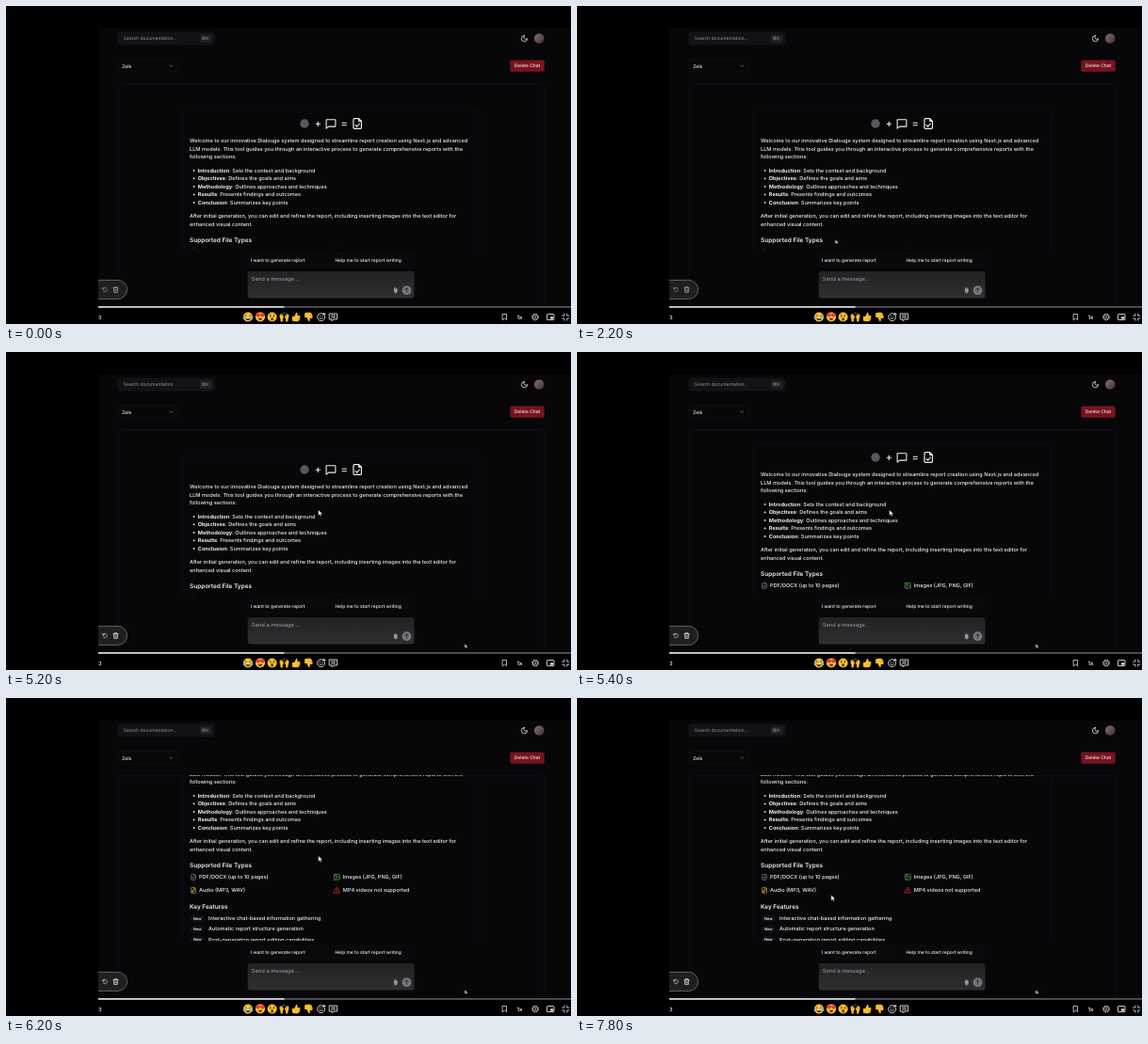
Animation, 600 px wide and 338 px high, one loop 8 s. Source, as an HTML page:

```html
<!DOCTYPE html>
<html lang="en">
<head>
<meta charset="utf-8">
<title>Report chat walkthrough</title>
<style>
html, body { margin: 0; width: 100%; height: 100%; overflow: hidden; background: #000; }
svg.stage { display: block; width: 100vw; height: 100vh; }
text { font-family: Inter, "Liberation Sans", sans-serif; fill: #f1f0f2; text-rendering: geometricPrecision; }
.copy { font-size: 5.59px; font-weight: 500; }
.bold { font-weight: 650; }
.head { font-size: 6.45px; font-weight: 600; }
.small { font-size: 4.92px; font-weight: 500; }
.tag { font-size: 4px; font-weight: 600; }
.muted { fill: #99979d; }
.line { fill: none; stroke: #eee; stroke-width: 2.2; stroke-linecap: round; stroke-linejoin: round; }
.edge { fill: none; stroke: #17151a; stroke-width: .6; }

.scroll, .pointer, .tools { animation: 8s step-end infinite; }
.scroll { animation-name: scroll; }
.outer { animation-name: outer; }
.inner { animation-name: inner; }
.tools { animation-name: tools; }
@keyframes scroll {
  0% { transform: translateY(0); }
  67.5% { transform: translateY(-13px); }
  70% { transform: translateY(-35.4px); }
  72.5% { transform: translateY(-55px); }
  75% { transform: translateY(-66px); }
  77.5%, 100% { transform: translateY(-71px); }
}
@keyframes outer {
  0% { visibility: hidden; transform: translate(284px, 300px); }
  22.5% { visibility: visible; transform: translate(282px, 288px); }
  25% { visibility: visible; transform: translate(276px, 258px); }
  27.5% { visibility: visible; transform: translate(274.4px, 248.6px); }
  30% { visibility: visible; transform: translate(278px, 250px); }
  32.5% { visibility: visible; transform: translate(300px, 262px); }
  35% { visibility: visible; transform: translate(360px, 290px); }
  37.5% { visibility: visible; transform: translate(430px, 316px); }
  40% { visibility: visible; transform: translate(480px, 325px); }
  42.5% { visibility: visible; transform: translate(488px, 317px); }
  45%, 100% { visibility: visible; transform: translate(487.2px, 310.4px); }
}
@keyframes inner {
  0% { visibility: hidden; transform: translate(322px, 176px); }
  42.5% { visibility: visible; transform: translate(325px, 173px); }
  45% { visibility: visible; transform: translate(331px, 167.8px); }
  55% { visibility: visible; transform: translate(331.7px, 167.8px); }
  85% { visibility: visible; transform: translate(326px, 172px); }
  87.5% { visibility: visible; transform: translate(308px, 184px); }
  90% { visibility: visible; transform: translate(290px, 196px); }
  92.5% { visibility: visible; transform: translate(278px, 205px); }
  95% { visibility: visible; transform: translate(272px, 209px); }
  97.5%, 100% { visibility: visible; transform: translate(269.8px, 209.4px); }
}
@keyframes tools {
  0% { opacity: .65; }
  30%, 100% { opacity: 1; }
}
</style>
</head>
<body>
<svg class="stage" viewBox="0 0 600 338" xmlns="http://www.w3.org/2000/svg">
<defs>
  <clipPath id="view"><rect x="119" y="82.5" width="453" height="175"/></clipPath>
  <clipPath id="page"><rect x="98" y="24" width="502" height="314"/></clipPath>
  <linearGradient id="photo" x1="0" y1="0" x2="1" y2="1">
    <stop offset="0" stop-color="#7c6d74"/><stop offset=".55" stop-color="#624d56"/><stop offset="1" stop-color="#30282d"/>
  </linearGradient>
  <linearGradient id="field" x2="0" y2="1">
    <stop offset="0" stop-color="#222124"/><stop offset="1" stop-color="#2f2e31"/>
  </linearGradient>
  <path id="arrow" d="M0 0V6.4L1.6 5 2.7 7.2 3.8 6.7 2.8 4.6H4.7Z" fill="#fff" stroke="#222" stroke-width=".35"/>
  <!-- Icons on a 24 unit grid, centred on the origin -->
  <g id="message"><path d="M-9-9H9Q10-9 10-8V5Q10 6 9 6H-5L-10 10V-8Q-10-9-9-9Z"/></g>
  <g id="file"><path d="M3-10H-6Q-8-10-8-8V8Q-8 10-6 10H6Q8 10 8 8V-5ZV-5H8"/></g>
  <g id="picture"><rect x="-9" y="-9" width="18" height="18" rx="2"/><circle cx="-3" cy="-3" r="2"/><path d="M9 3 4-2-6 9"/></g>
  <g id="warn"><path d="M0-9 10 8H-10ZM0-3V2M0 5V5.2"/></g>
  <g id="chevron"><path d="M-6-3 0 3 6-3"/></g>
  <circle id="face" r="5.4" fill="#fdc62f"/>
  <g id="thumb">
    <path d="M-4.3-.4H-1.9L.3-5.1Q2.2-5 1.5-1.6H4Q5.2-1 4.4.3 5 1.3 4.1 2.1 4.3 3.2 3.4 3.6 3.2 5 1.8 5H-1.5L-4.3 4.3Z" fill="#fcc02c"/>
    <path d="M1.7.3H4.2M1.6 2.1H4M1.5 3.7H3.3" fill="none" stroke="#c98512" stroke-width=".5"/>
  </g>
</defs>

<rect width="600" height="338" fill="#000"/>
<rect x="98" y="24" width="501" height="296" fill="#070609"/>

<!-- Top bar -->
<rect x="119" y="28" width="102" height="13" rx="2" fill="#121115" stroke="#1d1b20" stroke-width=".5"/>
<text class="muted" x="124.8" y="36.3" font-size="4.95">Search documentation...</text>
<rect x="206" y="30.3" width="12.5" height="8.4" rx="1.2" fill="#212024"/>
<text class="muted" x="207.6" y="36.1" font-size="4.6" style="font-family:Inter,'DejaVu Sans',sans-serif">⌘K</text>
<path class="line" transform="translate(550.5 34.6) scale(.35)" d="M0-9A6 6 0 0 0 9 0A9 9 0 1 1 0-9Z"/>
<circle cx="566.2" cy="34.5" r="5.3" fill="url(#photo)"/>

<rect class="edge" x="119" y="57" width="64" height="13" rx="2"/>
<text class="small" x="123.2" y="65.5">Zelk</text>
<use href="#chevron" class="line" style="stroke:#99979d" transform="translate(175.2 63.7) scale(.26)"/>
<rect x="535.4" y="57.4" width="36.3" height="12.3" rx="1.6" fill="#77131f"/>
<text class="small" x="553.5" y="65.4" text-anchor="middle">Delete Chat</text>

<!-- Chat panel -->
<path class="edge" d="M119.3 320V85Q119.3 82.6 121.7 82.6H569.3Q571.7 82.6 571.7 85V320"/>
<g clip-path="url(#view)">
 <g class="scroll">
  <rect class="edge" x="187.3" y="110.8" width="316" height="290" rx="3"/>
  <circle cx="317" cy="125" r="4.7" fill="#59585d"/>
  <path d="M328.7 125.3H333.9M331.3 122.7V127.9M356.7 124.2H361.8M356.7 126.7H361.8" stroke="#eee" stroke-width="1.1"/>
  <use href="#message" class="line" transform="translate(345 125.2) scale(.49)"/>
  <g class="line" transform="translate(373.2 125) scale(.53)"><use href="#file"/><path d="M-4 3-1 6 4 0"/></g>

  <g class="copy" transform="translate(0 .2)">
   <text x="195" y="145.1">Welcome to our innovative Dialouge system designed to streamline report creation using Next.js and advanced</text>
   <text x="195" y="153.7">LLM models. This tool guides you through an interactive process to generate comprehensive reports with the</text>
   <text x="195" y="162.3">following sections:</text>
   <g fill="#eee">
    <circle cx="199.6" cy="174.7" r=".95"/><circle cx="199.6" cy="183.2" r=".95"/><circle cx="199.6" cy="191.7" r=".95"/><circle cx="199.6" cy="200.2" r=".95"/><circle cx="199.6" cy="208.7" r=".95"/>
   </g>
   <text x="203.8" y="176.6"><tspan class="bold">Introduction</tspan>: Sets the context and background</text>
   <text x="203.8" y="185.1"><tspan class="bold">Objectives</tspan>: Defines the goals and aims</text>
   <text x="203.8" y="193.6"><tspan class="bold">Methodology</tspan>: Outlines approaches and techniques</text>
   <text x="203.8" y="202.1"><tspan class="bold">Results</tspan>: Presents findings and outcomes</text>
   <text x="203.8" y="210.6"><tspan class="bold">Conclusion</tspan>: Summarizes key points</text>
   <text x="195" y="224.9">After initial generation, you can edit and refine the report, including inserting images into the text editor for</text>
   <text x="195" y="233.4">enhanced visual content.</text>
   <text class="head" x="195" y="251.2">Supported File Types</text>

   <g class="line" style="stroke:#85818b" transform="translate(199 261.1) scale(.3)"><use href="#file"/><path d="M-4 0H4M-4 5H4"/></g>
   <text x="205" y="263">PDF/DOCX (up to 10 pages)</text>
   <use href="#picture" class="line" style="stroke:#63a95b" transform="translate(351.3 261.1) scale(.32)"/>
   <text x="357.8" y="263">Images (JPG, PNG, GIF)</text>
   <g class="line" style="stroke:#d3a535" transform="translate(199 275.2) scale(.3)"><use href="#file"/><path d="M-2 5V-2L3-3V4"/><circle cx="-4" cy="5" r="2"/></g>
   <text x="205" y="277.1">Audio (MP3, WAV)</text>
   <use href="#warn" class="line" style="stroke:#d32d35" transform="translate(351.3 275.2) scale(.33)"/>
   <text x="357.8" y="277.1">MP4 videos not supported</text>

   <text class="head" x="195" y="295">Key Features</text>
   <g fill="#110f14">
    <rect x="196" y="301.2" width="15" height="8" rx="4"/><rect x="196" y="312.4" width="15" height="8" rx="4"/><rect x="196" y="323.7" width="15" height="8" rx="4"/>
   </g>
   <text class="tag" x="199" y="306.7">New</text><text x="215" y="307.1">Interactive chat-based information gathering</text>
   <text class="tag" x="199" y="317.9">New</text><text x="215" y="318.3">Automatic report structure generation</text>
   <text class="tag" x="199" y="329.2">New</text><text x="215" y="329.6">Post-generation report editing capabilities</text>
  </g>
 </g>
</g>

<!-- Suggestions and message box -->
<g fill="#09080b" stroke="#121015" stroke-width=".5">
 <rect x="256.8" y="263" width="86.5" height="14" rx="2"/><rect x="346" y="263" width="87.3" height="14" rx="2"/>
</g>
<text class="small" x="259.8" y="271.8">I want to generate report</text>
<text class="small" x="349.4" y="271.8">Help me to start report writing</text>
<rect x="256.7" y="282" width="176.8" height="28.5" rx="3" fill="url(#field)"/>
<text x="260.8" y="291.6" font-size="5.78" style="fill:#a09fa3">Send a message...</text>
<path class="line" transform="translate(413.8 302.2) scale(.27)" d="M5-5V5A5 5 0 0 1-5 5V-6A3.5 3.5 0 0 1 2-6V4A1.6 1.6 0 0 1-1.5 4V-4"/>
<circle cx="425.5" cy="302.2" r="4.9" fill="#77767a"/>
<path d="M425.5 304.7V299.8M423.4 301.8 425.5 299.7 427.6 301.8" fill="none" stroke="#222" stroke-width=".8"/>

<!-- Recorder tools -->
<g clip-path="url(#page)">
 <rect x="80" y="291.4" width="48.6" height="20" rx="10" fill="#1f1e20" stroke="#626163" stroke-width="1"/>
 <g class="tools">
  <path class="line" transform="translate(105 301.5) scale(.27)" d="M-8-8V-2H-2M-8-3A8.5 8.5 0 1 1-6 6"/>
  <path class="line" transform="translate(116.5 301.5) scale(.3)" d="M-9-6H9M-7-6-6 10H6L7-6M-4-6V-10H4V-6M-2-1V6M2-1V6"/>
 </g>
</g>

<!-- Player bar -->
<rect x="98" y="320" width="502" height="18" fill="#000"/>
<rect x="98" y="319.2" width="502" height="1.4" fill="#6a696b"/>
<rect x="98" y="319.2" width="197.5" height="1.4" fill="#f4f4f4"/>
<text x="98" y="332.6" font-size="5.7" font-weight="500">3</text>

<g transform="translate(257 330.5) scale(.93)">
 <use href="#face"/>
 <path d="M-3.2.4H3.2Q2.8 4 0 4T-3.2.4Z" fill="#6b3213"/><path d="M-2.8.5H2.8L2.5 1.5H-2.5Z" fill="#fff"/>
 <path d="M-3.5-1.2-1.6-1.9-3.4-2.8M3.5-1.2 1.6-1.9 3.4-2.8" fill="none" stroke="#6b3213" stroke-width=".6"/>
 <ellipse cx="-4.5" cy="1" rx="1.1" ry="1.7" fill="#53b9ee" transform="rotate(35 -4.5 1)"/><ellipse cx="4.5" cy="1" rx="1.1" ry="1.7" fill="#53b9ee" transform="rotate(-35 4.5 1)"/>
</g>
<g transform="translate(270 330.5) scale(.93)">
 <use href="#face"/>
 <path id="heart" d="M-2.6 .4Q-6.2-2-4.9-3.8-3.4-4.9-2.6-3.3-1.6-4.9-.3-3.8.8-1.8-2.6.4Z" fill="#ee2f45"/><use href="#heart" x="5.2"/>
 <path d="M-2.5 1.4H2.5Q2 4 0 4T-2.5 1.4Z" fill="#6b3213"/>
</g>
<g transform="translate(282.6 330.5) scale(.93)">
 <use href="#face"/>
 <g fill="#5b3014"><ellipse cx="-1.9" cy="-1.2" rx=".8" ry="1.1"/><ellipse cx="1.9" cy="-1.2" rx=".8" ry="1.1"/><ellipse cy="2.4" rx="1.5" ry="1.9"/></g>
 <path d="M-3.2-3.3-1.3-3.8M3.2-3.3 1.3-3.8" stroke="#5b3014" stroke-width=".5"/>
</g>
<g transform="translate(295.5 330.5) scale(.93)">
 <path id="hand" d="M-1.9 5H-4Q-3.9 3-4.7 1.4L-5.2-1.6-4.6-3.2-3.9-1.6-3.5-3.8-2.8-1.5-2.1-3.2-1.9-.3-.8-1.3Q-.4.6-1.8 2Z" fill="#fcc02c" stroke="#fcc02c" stroke-width=".4" stroke-linejoin="round"/>
 <use href="#hand" transform="scale(-1 1)"/>
 <path d="M-1.2-3.8-1.6-5M0-3.7V-5.2M1.2-3.8 1.6-5" stroke="#4ea9e8" stroke-width=".6"/>
</g>
<use href="#thumb" transform="translate(308 330.5) scale(.95)"/>
<use href="#thumb" transform="translate(321.2 330.5) scale(.95 -.95)"/>
<g class="line" transform="translate(334.6 330.5) scale(.4)"><path d="M4-9A10 10 0 1 0 10-2M8-11V-4M4.5-7.5H11.5M-4 3Q0 7 4 3M-3-3V-2.5M3-3V-2.5"/></g>
<g class="line" transform="translate(347.6 330.6) scale(.4)"><path d="M-10-9H10V6H1L-4 10V6H-10ZM-5-4H5M-5 1H5"/></g>

<path class="line" transform="translate(529.5 330.6) scale(.34)" d="M-6-9H6V9L0 4-6 9Z"/>
<text x="545.5" y="332.7" font-size="5.9" font-weight="600" text-anchor="middle">1x</text>
<g transform="translate(562 330.6)" fill="none" stroke="#eee">
 <circle r="3.4" stroke-width=".8" stroke-dasharray="1.4 1.27"/><circle r="2.8" stroke-width=".7"/><circle r="1.1" stroke-width=".6"/>
</g>
<g transform="translate(578.2 330.6)"><rect x="-3.8" y="-3" width="7.6" height="6" rx=".7" fill="none" stroke="#eee" stroke-width=".9"/><rect x="-.1" y="-.2" width="3" height="2.2" fill="#eee"/></g>
<path class="line" transform="translate(594.3 330.6) scale(.36)" d="M-10-4H-4V-10M10-4H4V-10M-10 4H-4V10M10 4H4V10"/>

<!-- Pointers -->
<g class="pointer outer"><use href="#arrow" transform="scale(.62)"/></g>
<g class="pointer inner"><use href="#arrow" transform="scale(.9)"/></g>
</svg>
</body>
</html>
```
